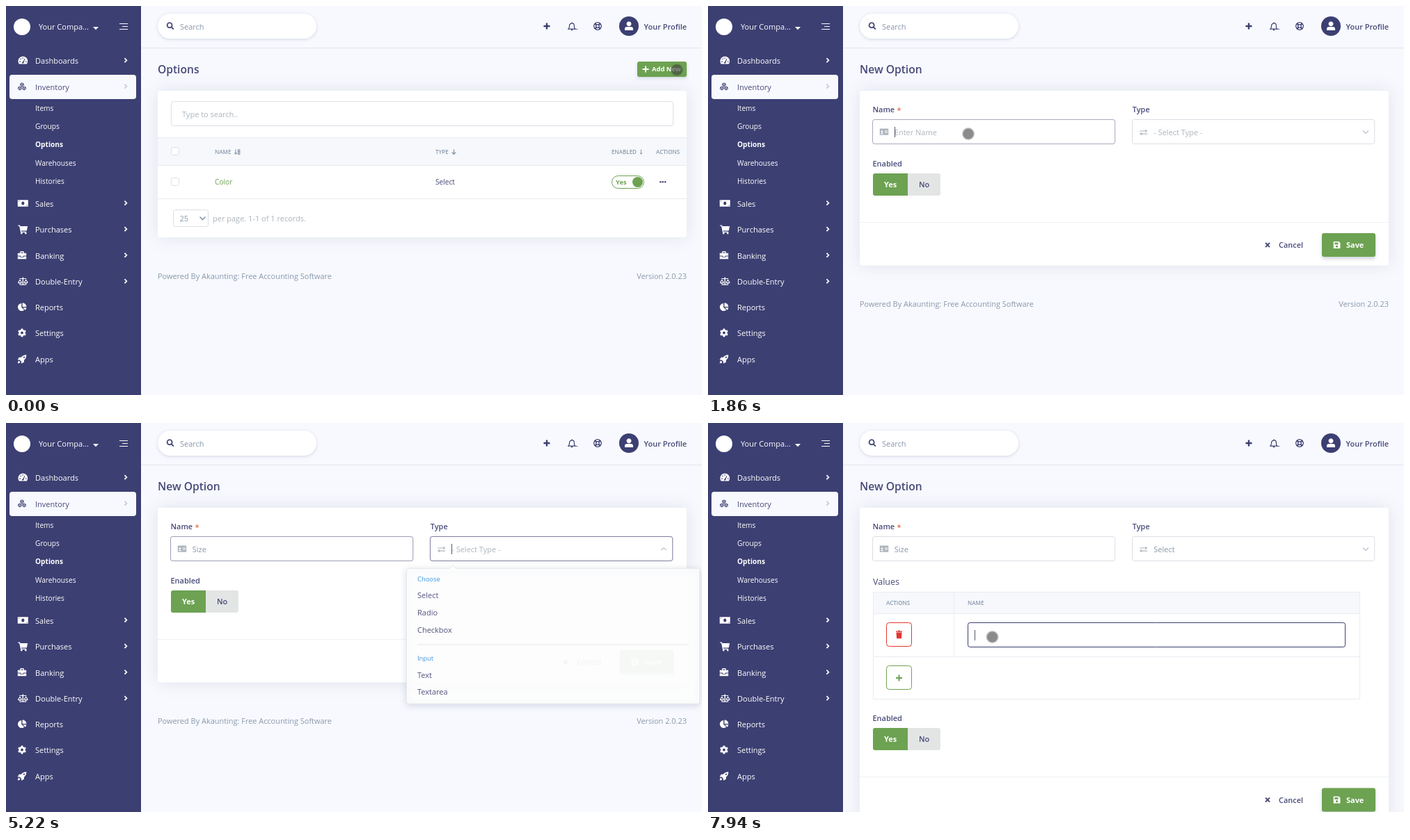
These frames come from a looping animation (1000 by 560 pixels, 8 s). An HTML page with a canvas:

```html
<!DOCTYPE html>
<html lang="en">
<head>
<meta charset="utf-8">
<title>New Option</title>
<style>
html, body { margin: 0; width: 100%; height: 100%; overflow: hidden; background: #f8f9fe; }
canvas { display: block; }
</style>
</head>
<body>
<canvas id="stage" width="1000" height="560"></canvas>
<script>
const ctx = document.getElementById('stage').getContext('2d');
const LOOP = 8000, STEP = 75, RIGHT = 978;
const NAVY = '#3c3f72', INK = '#474a79', GREEN = '#6da252', MUTED = '#8898aa', HINT = '#adb5bd',
  LINE = '#e9ecf2', BORDER = '#dcdee6', PAGE = '#f8f9fe', HEAD = '#f6f8fc', RED = '#e23531';

// Icons are centred on their own zero point.
const ICONS = {
  dash: 'M-5.6 5A6.9 6.9 0 1 1 5.6 5ZM-1.3 3.4A1.4 1.4 0 0 0 1.3 3L3-2.4 2.2-2.7.2 1.7A1.5 1.5 0 0 0-1.3 3.4ZM-5 1h1.5v1.4H-5ZM-3.8-2.8h1.5v1.4h-1.5ZM-.8-4.3H.7v1.4H-.8ZM3.8 1h1.4v1.4H3.8Z',
  money: 'M-7.5-4.7h15v9.4h-15ZM0-2.6a2.1 2.6 0 1 0 .01 0ZM-6.3-3.5v1.4l1.4-1.4ZM6.3 3.5V2.1L4.9 3.5Z',
  cart: 'M-7-6h2.8l.4 1.6H6.9L5.5 2H-2.4l.3 1.2H4.9v1.2H-3.2L-5.2-4.7H-7ZM-2 4.2a1.4 1.4 0 1 0 .01 0ZM4 4.2a1.4 1.4 0 1 0 .01 0Z',
  bag: 'M-6.2-3.2h3.4v-1.6q0-1.1 1.1-1.1h3.4q1.1 0 1.1 1.1v1.6h3.4V.5h-4.5v1.4h-3.4V.5h-4.5ZM-1.5-4.6v1.4h3v-1.4ZM-6.2 1.4h3.6v1.4h5.2V1.4h3.6v3.8H-6.2Z',
  scales: 'M-.7-6H.7v1.4H5v1.2H.7v7.4H5v1.3H-5V4H-.7v-7.4H-5v-1.2h4.3ZM-4.3-3.2-1.2 1.6a3.2 2.2 0 0 1-6.2 0ZM-4.3-1.2-6 1.4h3.4ZM4.3-3.2 7.4 1.6a3.2 2.2 0 0 1-6.2 0ZM4.3-1.2 2.6 1.4H6Z',
  pie: 'M-.8-5.6A5.6 5.6 0 1 0 3.2 4.2L-.8.2ZM.6-6.2A5.8 5.8 0 0 1 6.4-.5H.6ZM1.2.7H6.4A5.8 5.8 0 0 1 4.7 4.2Z',
  rocket: 'M6.3-6.2Q1.5-6.4-1.2-2.7H-4.2L-6.3 1.1h3.1L-.9 3.4v2.9L2.9 4.3V1.2Q6.6-1.6 6.3-6.2ZM3-4a1.1 1.1 0 1 0 .01 0ZM-4.3 2.3Q-6.3 2.9-6.2 6-3.2 6-2.4 4.2Z',
  card: 'M-6.2-4.5H6.2v9.2H-6.2ZM-3-1.8a1.4 1.4 0 1 0 .01 0ZM-5 3.3h4Q-1 1.5-3 1.5T-5 3.3ZM1-1.6h4v1H1ZM1 .6h4v1H1Z',
  swap: 'M-5.5-2.6H2.6v-1.8L5.6-2 2.6.3v-1.7H-5.5ZM5.5 1.5H-2.6V-.2L-5.6 2.1l3 2.3V2.7H5.5Z',
  save: 'M-4.8-4.9H2.8L4.9-2.8V4.9H-4.8ZM-3.2-3.5v2.8H2v-2.8ZM0 .6a1.6 1.6 0 1 0 .01 0Z',
  trash: 'M-4.5-5h3l.6-.9h1.8l.6.9h3v1.3h-9ZM-4-3h8L3.4 5.8h-6.8Z',
  user: 'M0-6.8a3.5 3.5 0 1 0 .01 0ZM-6 6V4Q-6 1-3 1H3Q6 1 6 4V6Z',
  bell: 'M-5 3.6Q-3.4 2-3.4-1T0-4.6 3.4-1 5 3.6Z',
  bellTip: 'M-1.2 5H1.2M0-6v1',
  times: 'M-3-3 3 3M3-3-3 3',
  plus: 'M-4.5 0h9M0-4.5v9',
  lens: 'M-.9-4.8a3.5 3.5 0 1 0 .01 0ZM1.6 1.2 4.8 4.5',
  down: 'M-4-2 0 2 4-2',
  right: 'M-1.6-3 1.4 0-1.6 3',
  arrow: 'M0-3.6V3.4M-3 .4 0 3.5 3 .4',
  sort: 'M-2-3.4V3.2M-3.8 1.4-2 3.2-.2 1.4M1.4-3.3H3.8V-.6H1.4ZM1.4.8H3.8V3.4H1.4Z'
};
for (const k in ICONS) ICONS[k] = new Path2D(ICONS[k]);

const MENU = [
  ['Dashboards', 79, 'dash'], ['Inventory', 116.5, 'cubes'], ['Sales', 284.5, 'money'],
  ['Purchases', 322, 'cart'], ['Banking', 359.5, 'bag'], ['Double-Entry', 397, 'scales'],
  ['Reports', 434, 'pie'], ['Settings', 471, 'cog'], ['Apps', 509, 'rocket']
];
const SUBMENU = ['Items', 'Groups', 'Options', 'Warehouses', 'Histories'];

function text(s, x, cy, color = INK, size = 11, weight = 400, align = 'left') {
  ctx.font = `${weight} ${size}px "Open Sans", sans-serif`;
  ctx.textAlign = align;
  ctx.fillStyle = color;
  ctx.fillText(s, x, cy + size * 0.36);
}

function box(x, y, w, h, r, fill, stroke) {
  ctx.beginPath();
  const o = stroke ? 0.5 : 0;
  ctx.roundRect(x + o, y + o, w - 2 * o, h - 2 * o, r);
  if (fill) { ctx.fillStyle = fill; ctx.fill(); }
  if (stroke) { ctx.strokeStyle = stroke; ctx.lineWidth = 1; ctx.stroke(); }
}

function raised(blur, dy, alpha, draw) {
  ctx.save();
  ctx.shadowColor = `rgba(100,115,145,${alpha})`;
  ctx.shadowBlur = blur;
  ctx.shadowOffsetY = dy;
  draw();
  ctx.restore();
}

function rule(x, y, w, color = LINE) { box(x, y, w, 1, 0, color); }

function disc(x, y, r, fill) {
  ctx.beginPath();
  ctx.arc(x, y, r, 0, 7);
  ctx.fillStyle = fill;
  ctx.fill();
}

function ring(x, y, r, color, width) {
  ctx.beginPath();
  ctx.arc(x, y, r, 0, 7);
  ctx.strokeStyle = color;
  ctx.lineWidth = width;
  ctx.stroke();
}

// A line width makes the icon an outline.
function icon(name, x, y, color, width = 0, flip = 1) {
  ctx.save();
  ctx.translate(x, y);
  ctx.scale(1, flip);
  ctx.fillStyle = ctx.strokeStyle = color;
  ctx.lineWidth = width;
  if (name === 'cubes') cubes();
  else if (name === 'cog') cog(color);
  else if (width) ctx.stroke(ICONS[name]);
  else ctx.fill(ICONS[name], 'evenodd');
  ctx.restore();
}

function cubes() {
  ctx.lineWidth = 1;
  for (const [x, y] of [[0, -2.7], [-3.1, 2.4], [3.1, 2.4]]) {
    ctx.beginPath();
    for (let i = 0; i < 6; i++) ctx.lineTo(x + 2.5 * Math.sin(i * Math.PI / 3), y + 2.5 * Math.cos(i * Math.PI / 3));
    ctx.closePath();
    ctx.moveTo(x - 2.2, y - 1.2);
    ctx.lineTo(x, y);
    ctx.lineTo(x + 2.2, y - 1.2);
    ctx.moveTo(x, y);
    ctx.lineTo(x, y + 2.5);
    ctx.stroke();
  }
}

function cog(color) {
  ring(0, 0, 3.3, color, 2.8);
  for (let i = 0; i < 6; i++) {
    ctx.rotate(Math.PI / 3);
    ctx.fillRect(-1.4, -5.9, 2.8, 2);
  }
}

function pointer(x, y, alpha = 1) {
  ctx.globalAlpha = alpha;
  disc(x, y, 9, 'rgba(60,60,60,.3)');
  disc(x, y, 7.5, 'rgba(60,60,60,.42)');
  ctx.globalAlpha = 1;
}

function caret(x, y = 174) { box(Math.floor(x), y, 1, 15, 0, '#55586f'); }

// Stepped progress from 0 to 1 after a start time.
function ramp(t, start, steps) {
  return t < start ? 0 : Math.min(1, (Math.floor((t - start) / STEP) + 1) / steps);
}
const within = (t, ...spans) => spans.some(([a, b]) => t >= a && t < b);
const easeOut = p => 1 - (1 - p) ** 3;

function sidebar(w) {
  const slim = w < 100, full = w > 180;
  ctx.save();
  ctx.beginPath();
  ctx.rect(0, 0, w, 560);
  ctx.clip();
  box(0, 0, w, 560, 0, NAVY);
  disc(23, 30, 12, '#fff');
  if (full) {
    text('Your Compa...', 47, 30.5, '#fff');
    ctx.beginPath();
    ctx.moveTo(125, 30);
    ctx.lineTo(133, 30);
    ctx.lineTo(129, 34.3);
    ctx.fill();
    rule(163, 25, 12, '#fff');
    rule(167, 29, 8, '#fff');
    rule(163, 33, 12, '#fff');
  }
  box(5, 99, w - 12, 35, 4, PAGE);
  MENU.forEach(([name, y, glyph], i) => {
    const active = i === 1, cy = y + (slim && i > 5 ? 14 : 0);
    icon(glyph, i === 0 || glyph === 'money' || glyph === 'scales' || glyph === 'cart' ? 24.3 : 23, cy - 0.5, active ? NAVY : '#fff');
    if (slim && i === 5) {
      text('Double-', 42, 396, '#fff');
      text('Entry', 42, 412, '#fff');
    } else if (!slim || !active) text(name, 42, cy + 0.2, active ? INK : '#fff');
    if (full && i < 6) icon('right', 172, cy - 0.8, active ? '#c9cad6' : '#fff', 1.7);
  });
  SUBMENU.forEach((s, i) => text(s, 42, 147 + i * 26.3, '#fff', 10.16, i === 2 ? 700 : 400));
  if (slim) box(1, 558, 12, 2, 0, '#8b8da6');
  ctx.restore();
}

function header(w) {
  const l = w + 24;
  rule(w, 60, 1000 - w, '#e4e6ee');
  raised(4, 1, 0.25, () => box(l, 11, 228, 36, 18, '#fff'));
  icon('lens', l + 18, 29, INK, 1.8);
  text('Search', l + 32, 29.7, MUTED);
  icon('plus', 777, 29, NAVY, 2.4);
  icon('bell', 813, 29.5, NAVY, 1.2);
  icon('bellTip', 813, 29.5, NAVY, 1.4);
  ring(850, 29, 5.3, NAVY, 1.3);
  ring(850, 29, 2.3, NAVY, 1.2);
  for (let i = 0; i < 4; i++) {
    const a = Math.PI / 4 + i * Math.PI / 2;
    ctx.beginPath();
    ctx.moveTo(850 + 2.3 * Math.cos(a), 29 + 2.3 * Math.sin(a));
    ctx.lineTo(850 + 5.5 * Math.cos(a), 29 + 5.5 * Math.sin(a));
    ctx.lineWidth = 2;
    ctx.stroke();
  }
  disc(895, 29, 14, NAVY);
  icon('user', 895, 29, '#fff');
  text('Your Profile', RIGHT, 29.7, INK, 10.94, 600, 'right');
}

function card(l, bottom) {
  raised(25, 0, 0.16, () => box(l, 122, RIGHT - l, bottom - 122, 4, '#fff'));
}

function credits(l, y) {
  text('Powered By Akaunting: Free Accounting Software', l, y, MUTED, 10.94);
  text('Version 2.0.23', RIGHT, y, MUTED, 10.94, 400, 'right');
}

function column(s, x, y) { text(s, x, y, MUTED, 8, 600); }

function listPage() {
  text('Options', 218, 91, INK, 15.6, 600);
  raised(4, 2, 0.25, () => box(907, 80, 71, 22, 3, GREEN));
  icon('plus', 919, 91, '#fff', 2);
  text('Add New', 928, 91, '#fff', 9.4, 700);
  card(218, 333);
  box(237, 137, 722, 36, 3, '#fff', BORDER);
  text('Type to search..', 253, 156, HINT);
  box(218, 189, 760, 41, 0, HEAD);
  [189, 229, 277].forEach(y => rule(218, y, 760));
  box(237, 203, 12, 12, 3, '#fff', BORDER);
  box(237, 247, 12, 12, 3, '#fff', BORDER);
  column('NAME', 300, 210);
  icon('sort', 332, 210, MUTED, 1.1);
  column('TYPE', 617, 210);
  icon('arrow', 643.5, 210, MUTED, 1.3);
  column('ENABLED', 870, 210);
  icon('sort', 914.5, 210, MUTED, 1);
  box(915, 205, 5, 10, 0, HEAD);
  column('ACTIONS', 934, 210);
  text('Color', 300, 253.7, GREEN, 10.16);
  text('Select', 617, 253.7, INK, 10.16);
  box(870, 244, 47, 19, 9, '#fff', GREEN);
  text('Yes', 876, 253.7, GREEN, 9.4, 700);
  disc(907.5, 253.5, 7.5, GREEN);
  for (let i = -1; i < 2; i++) disc(943.7 + i * 3.4, 253.3, 1.3, INK);
  box(240, 293, 51, 25, 3, '#fff', BORDER);
  text('25', 249.5, 306, MUTED);
  icon('down', 282.5, 305.5, MUTED, 1.6);
  text('per page. 1-1 of 1 records.', 297, 306, HINT);
  credits(218, 389);
}

function field(x, y, w, focus) {
  box(x, y, w, 36, 3, '#fff', BORDER);
  ctx.globalAlpha = focus;
  if (focus) box(x, y, w, 36, 3, null, NAVY);
  ctx.globalAlpha = 1;
}

function valuesTable(t) {
  text('Values', 237, 228, INK, 12.5);
  box(237, 243, 699, 31, 0, HEAD);
  box(237, 243, 700, 155, 0, null, LINE);
  rule(237, 274, 699);
  rule(237, 336, 699);
  box(353, 243, 1, 93, 0, LINE);
  column('ACTIONS', 256, 259.5);
  column('NAME', 373, 259.5);
  box(256, 287, 37, 35, 4, '#fff', RED);
  icon('trash', 274.5, 304.5, RED);
  box(256, 349, 37, 35, 4, '#fff', GREEN);
  icon('plus', 274.5, 367, GREEN, 2);
  field(373, 287, 543, ramp(t, 7790, 3));
  if (t >= 7790) {
    caret(383, 298);
    pointer(408.5, 308);
  }
}

function dropdown(p) {
  ctx.save();
  ctx.globalAlpha = p;
  ctx.translate(0, 209);
  ctx.scale(1, p);
  raised(10, 2, 0.25, () => box(575, 0, 422, 209, 3, '#fff', '#e4e7ed'));
  ctx.beginPath();
  ctx.moveTo(637, 1);
  ctx.lineTo(642, -4);
  ctx.lineTo(647, 1);
  ctx.fillStyle = '#fff';
  ctx.fill();
  ctx.strokeStyle = '#e4e7ed';
  ctx.stroke();
  const group = (title, y, items) => {
    text(title, 591, y, '#2f8fe0', 9.4);
    items.forEach((s, i) => text(s, 591, y + 25.5 + i * 26.5));
  };
  group('Choose', 17, ['Select', 'Radio', 'Checkbox']);
  rule(591, 117, 390, '#e4e7ed');
  group('Input', 139, ['Text', 'Textarea']);
  ctx.restore();
}

function formPage(t, w) {
  const l = w + 24, x = l + 18.5, fw = (959 - x - 24) / 2, x2 = 959 - fw;
  const chosen = t >= 6620, dy = chosen ? 198.5 : 0;
  const open = easeOut(ramp(t, 5070, 5)) * (1 - easeOut(ramp(t, 6620, 5)));
  const typed = 'Size'.slice(0, [3270, 3500, 3650, 3970].filter(k => t >= k).length);
  text('New Option', l, 91, INK, 15.6, 600);
  card(l, 373.5 + dy);

  text('Name', x, 149, INK, 10.94, 600);
  text('*', x + 35, 150, '#e5694a', 10.94, 600);
  field(Math.floor(x), 163, fw, ramp(t, 1790, 3) * (1 - ramp(t, 5070, 5)));
  icon('card', x + 16.5, 181, HINT);
  text(typed || 'Enter Name', x + 31.3, 182, typed ? MUTED : HINT);
  if (within(t, [1790, 2260], [2810, 4430], [4900, 5070])) {
    caret(x + 31.5 + (typed ? ctx.measureText(typed).width : 0));
  }

  text('Type', x2, 149, INK, 10.94, 600);
  field(Math.floor(x2), 163, fw, ramp(t, 5070, 5) * (1 - ramp(t, 7790, 3)));
  icon('swap', x2 + 16, 182, HINT);
  text(chosen ? 'Select' : '- Select Type -', x2 + 30.5, 182, chosen ? MUTED : HINT);
  icon('down', 945, 181.5, '#bcc1c9', 1.2, 1 - 2 * open);
  if (within(t, [5070, 5620], [6070, 6620])) caret(640);

  if (chosen) valuesTable(t);

  text('Enabled', x, 226.7 + dy, INK, 10.94, 600);
  const by = 241 + Math.floor(dy), bx = Math.floor(x + 0.5);
  box(bx, by, 50, 32, [3, 0, 0, 3], GREEN);
  box(bx + 50, by, 47, 32, [0, 3, 3, 0], '#e3e5e5');
  text('Yes', bx + 25, by + 16.3, '#fff', 10.94, 700, 'center');
  text('No', bx + 73.5, by + 16.3, INK, 10.94, 600, 'center');

  rule(l, 311 + Math.floor(dy), RIGHT - l, '#eff1f5');
  icon('times', 804, 344 + dy, INK, 1.8);
  text('Cancel', 820, 344.3 + dy, INK, 10.94, 600);
  raised(5, 3, 0.3, () => box(882, 327 + dy, 77, 34, 3, GREEN));
  icon('save', 903.5, 344 + dy, '#fff');
  text('Save', 917, 344.3 + dy, '#fff', 10.94, 700);
  credits(l, 429 + dy);
  if (open > 0) dropdown(open);
  if (t < 470) pointer(964, 92, t < 380 ? 1 : 0.45);
  if (within(t, [1790, 2090])) pointer(374, 184);
}

function draw(t) {
  const w = within(t, [310, 380]) ? 47 : within(t, [380, 470]) ? 160 : 194;
  box(0, 0, 1000, 560, 0, PAGE);
  header(w);
  if (t < 310) {
    listPage();
    pointer(964, 92);
  } else formPage(t, w);
  sidebar(w);
}

const begin = performance.now();
function tick() {
  draw((performance.now() - begin) % LOOP);
  requestAnimationFrame(tick);
}
tick();
</script>
</body>
</html>
```
